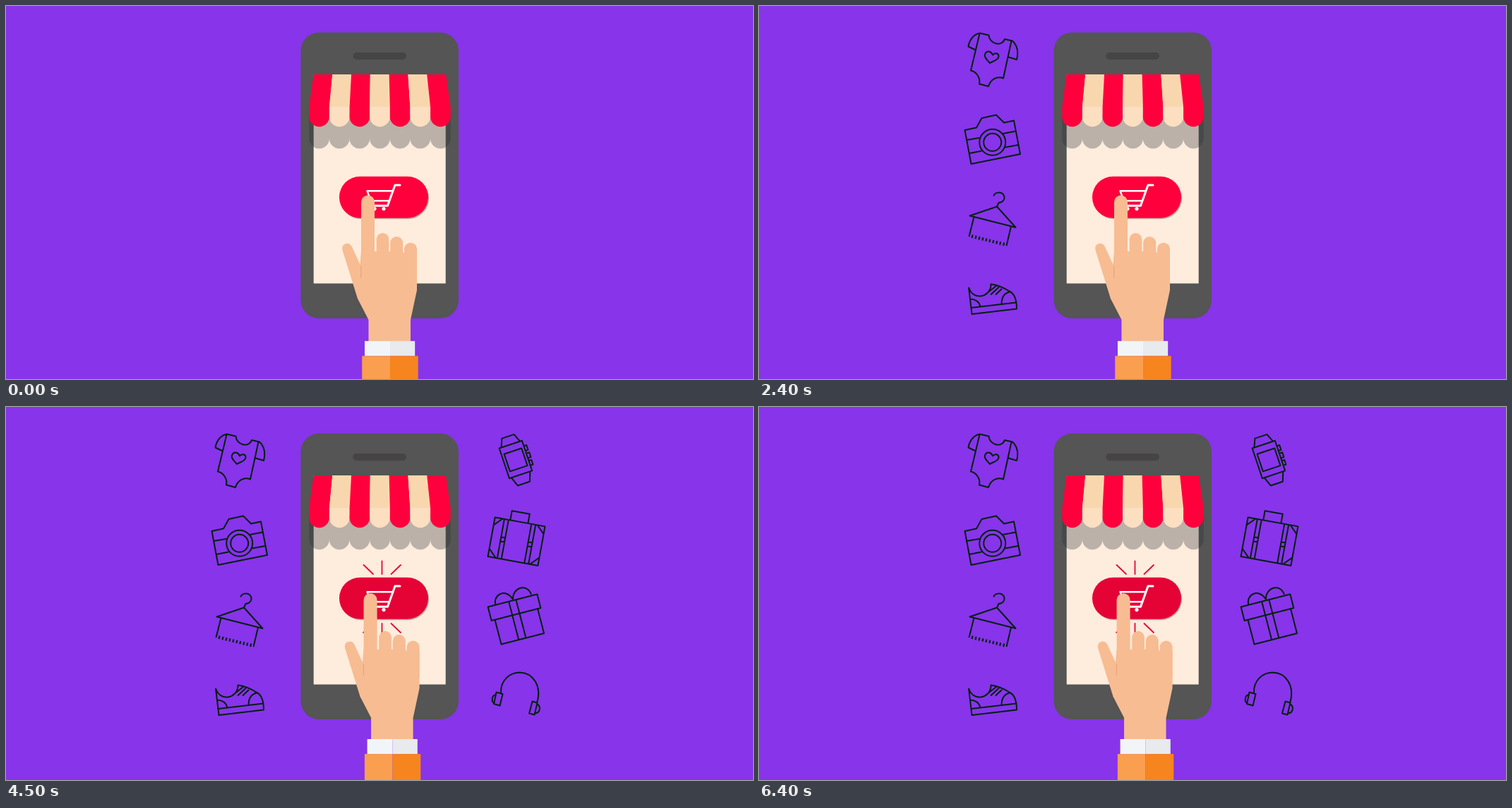
An HTML page with a canvas for the animation above (7.4 s loop, 1058x529 px).

```html
<!DOCTYPE html>
<html lang="en">
<head>
<meta charset="utf-8">
<title>Mobile shopping</title>
<style>
  html, body { margin: 0; width: 100%; height: 100%; overflow: hidden; background: #8734ea; }
  canvas { display: block; width: 1058px; height: 529px; }
</style>
</head>
<body>
<canvas id="stage" width="1058" height="529"></canvas>
<script>
const ctx = document.getElementById('stage').getContext('2d');
const LOOP = 7400, STEP = 300;
const RED = '#ff003c', DEEP_RED = '#e50336', SKIN = '#f7bc92', INK = '#03200f';

function rect(color, x, y, w, h) {
  ctx.fillStyle = color;
  ctx.fillRect(x, y, w, h);
}

function pill(color, x, y, w, h, r) {
  ctx.fillStyle = color;
  ctx.beginPath();
  ctx.roundRect(x, y, w, h, r);
  ctx.fill();
}

function fillPath(color, d) {
  ctx.fillStyle = color;
  ctx.fill(new Path2D(d));
}

function strokePath(color, width, d) {
  ctx.strokeStyle = color;
  ctx.lineWidth = width;
  ctx.stroke(new Path2D(d));
}

const ink = d => strokePath(INK, 2, d);

function turned(x, y, degrees, draw) {
  ctx.save();
  ctx.translate(x, y);
  ctx.rotate(degrees * Math.PI / 180);
  draw();
  ctx.restore();
}

// Awning: seven stripes that widen downwards and end in round flaps
const TOP = { x: 435.5, w: 187.5 / 7 }, FLAP = { x: 429.3, w: 200.4 / 7 };

function flaps(dy, paint) {
  for (let i = 0; i < 7; i++) {
    const x = FLAP.x + i * FLAP.w;
    paint(i, x, 143 + dy);
  }
}

function awning() {
  ctx.fillStyle = 'rgba(38,45,50,.31)';
  ctx.beginPath();
  flaps(31, (i, x, y) => ctx.roundRect(x, y - 20, FLAP.w, 48.2, [0, 0, 14.3, 14.3]));
  ctx.fill();
  for (let i = 0; i < 7; i++) {
    const a = TOP.x + i * TOP.w, b = FLAP.x + i * FLAP.w;
    fillPath(i % 2 ? '#f9d7ae' : RED,
      `M${a},97 H${a + TOP.w} L${b + FLAP.w},143.5 H${b}Z`);
  }
  flaps(0, (i, x, y) =>
    pill(i % 2 ? '#fbdfc0' : RED, x, y, FLAP.w, 28.2, [0, 0, 14.2, 14.2]));
}

function phone() {
  pill('#545554', 417.5, 37.5, 223.5, 405.5, 26);
  pill('#474445', 491.5, 66, 75.5, 10, 5);
  rect('#feecdd', 435.7, 97, 187, 296.5);
  awning();
}

function button(pressed) {
  pill('#bfb3aa', 473.2, 243.2, 126, 59, 29.5);
  pill(pressed ? DEEP_RED : RED, 472, 241.7, 126, 59, 29.5);
  strokePath('#fff', 3, 'M558,254 H551 L540.5,283.3 H520');
  strokePath('#fff', 2.4, 'M547,262.2 H511.5 L519,282 M516,276.2 H542');
  ctx.fillStyle = '#fff';
  for (const x of [522, 535]) {
    ctx.beginPath();
    ctx.arc(x, 287.6, 2.6, 0, 7);
    ctx.fill();
  }
  if (pressed) {
    strokePath(DEEP_RED, 1.8,
      'M532.5,218.5 V237 M506.5,224 L520,237 M559,224 L545.5,237 ' +
      'M532.5,307 V322 M506,320 L520,307 M545.5,307 L559,320');
  }
}

function hand(pressed) {
  ctx.save();
  if (pressed) ctx.translate(3.6, -4.2);
  fillPath(SKIN, 'M476.6,346.5 C474,336 487,333 490.2,342 L503.5,371 V420 L498,415Z');
  pill(SKIN, 503, 268.5, 19, 110, 9.5);
  pill(SKIN, 524.7, 322, 17.6, 60, 8.8);
  pill(SKIN, 544.2, 327, 18, 60, 9);
  pill(SKIN, 564, 335.7, 18, 60, 9);
  fillPath(SKIN, 'M503,348 H562.5 L564,351 H582 V403 L573,445 V476 H513.5 V445 L498,415 L501,370Z');
  strokePath('#e2a27b', 1, 'M502.8,369 V385');
  rect('#f1f5f8', 508, 475.2, 36, 21.2);
  rect('#e8eaed', 544, 475.2, 35.2, 21.2);
  rect('#fa9e50', 504.3, 496.3, 39.7, 40);
  rect('#f6851f', 544, 496.3, 39.7, 40);
  ctx.restore();
}

function onesie() {
  ink('M313,38.5 L325.5,41.5 C326,53 343,59 348,47 L359,49.5 C366,56 367.5,66 365,76 L353.5,72.5' +
      ' M357.5,49.5 L346,102.5 C337,99 328,104 325,114 L312,110.5 C314,101 307,93 300,91.5 L312.5,39' +
      ' M313,38.5 C304,40 298,48 296.5,57.5 L307,62.5');
  ink('M327,81 C324,77 317,72 321,66.5 C324,63 329,64.5 331,69.5 C334,65.5 339.5,67 339.5,71.5 C339,77 331,78 327,81Z');
}

function camera() {
  ink('M291.5,176 L308,172.5 L315.5,159 L336,154.5 L347,165.5 L361,162.5 L370,210 L300.5,224Z' +
      ' M294.5,190 L312,187 M345.5,181 L364,177.5 M298,209 L315.5,205.5 M348.5,200.5 L367.5,197');
  for (const r of [18.5, 12.5]) {
    ctx.beginPath();
    ctx.arc(330.7, 193.3, r, 0, 7);
    ctx.stroke();
  }
}

function hanger() {
  ink('M332.3,269.5 C334,263.5 343,263 346.5,268 C349.5,274 345,279 339.5,279 L337,284.5' +
      ' L298.5,297.5 L363.5,314 L337,284.5 M304.5,299 L297.5,327 M357,312.5 L350.5,340');
  ctx.setLineDash([2.2, 2.9]);
  strokePath(INK, 4.5, 'M301,326.5 L350.5,338.7');
  ctx.setLineDash([]);
}

function shoe() {
  ink('M297,399 L301.5,437 L365,429.5 C365,418 362,408 354.5,404.5 C346,399 339,396 328.5,394.5' +
      ' C329,413 303,419 297,399 M300.5,428 L364.5,420.5 M299,415.5 C307,416 312,420 313.5,426' +
      ' M343.5,423 C343.5,413 348,407 355,405.5 M320.5,409 L336,397 M328,409.5 L340,398.5 M335,409.5 L344,401');
}

function watch() {
  turned(721.7, 74, -18.5, () => ink(
    'M-17,-22 H17 V23 H-17Z M-13,-12 H13 V14 H-13Z' +
    ' M-14,-22 L-9,-34 H9 L14,-22 M-14,23 L-9,36.5 H9 L14,23' +
    ' M17,-14 H21 V-7 H17 M17,-3 H21.5 V4 H17 M17,8 H21 V15 H17'));
}

function suitcase() {
  turned(723, 190.5, 10.3, () => ink(
    'M-36,-28 H36 V28.5 H-36Z M-14,-28 V-41.5 H11.5 V-28' +
    ' M-22.5,-28 V28 M-16.5,-28 V28 M16.5,-28 V28 M22.5,-28 V28' +
    ' M-22.5,-2 H-16.5 M-22.5,4 H-16.5 M16.5,-2 H22.5 M16.5,4 H22.5' +
    ' M-36,-17 L-25,-28 M36,-17 L25,-28 M-36,17 L-25,28 M36,17 L25,28'));
}

function gift() {
  turned(723, 300, -14.5, () => ink(
    'M-35,-26 H37 V-6 H-35Z M-30,-6 V30 H32.5 V-6 M-4.5,-26 V30 M6,-26 V30'));
  ink('M693.5,281 C689,266 708,256 718,273 M718,273 C717,256 738,249 744,266');
}

function headphones() {
  ink('M701,406 C700,387 714,376.5 728,376.5 C746,377 759.5,395 752,420' +
      ' M694.5,404.5 L703.5,407 L699.5,423.5 L691,421Z M693.5,408 C688,409 687,418 691.5,420' +
      ' M745.5,417.5 L752.5,419.5 L748.5,436.5 L741,434.5Z M752,421.5 C758,424 757,434 749,434.5');
}

const items = [onesie, camera, hanger, shoe, watch, suitcase, gift, headphones];

// Each press adds one item; afterwards the full set blinks.
function state(t) {
  if (t < 4500) {
    return { pressed: Math.floor(t / STEP) % 2 === 1, count: Math.floor((t + STEP) / (2 * STEP)) };
  }
  const off = (t >= 4900 && t < 5400) || (t >= 5900 && t < 6400);
  return { pressed: !off, count: off ? 0 : items.length };
}

function frame() {
  const { pressed, count } = state(performance.now() % LOOP);
  rect('#8734ea', 0, 0, 1058, 529);
  ctx.lineJoin = 'round';
  ctx.lineCap = 'butt';
  items.slice(0, count).forEach(draw => draw());
  phone();
  ctx.lineCap = 'round';
  button(pressed);
  hand(pressed);
  requestAnimationFrame(frame);
}
frame();
</script>
</body>
</html>
```
